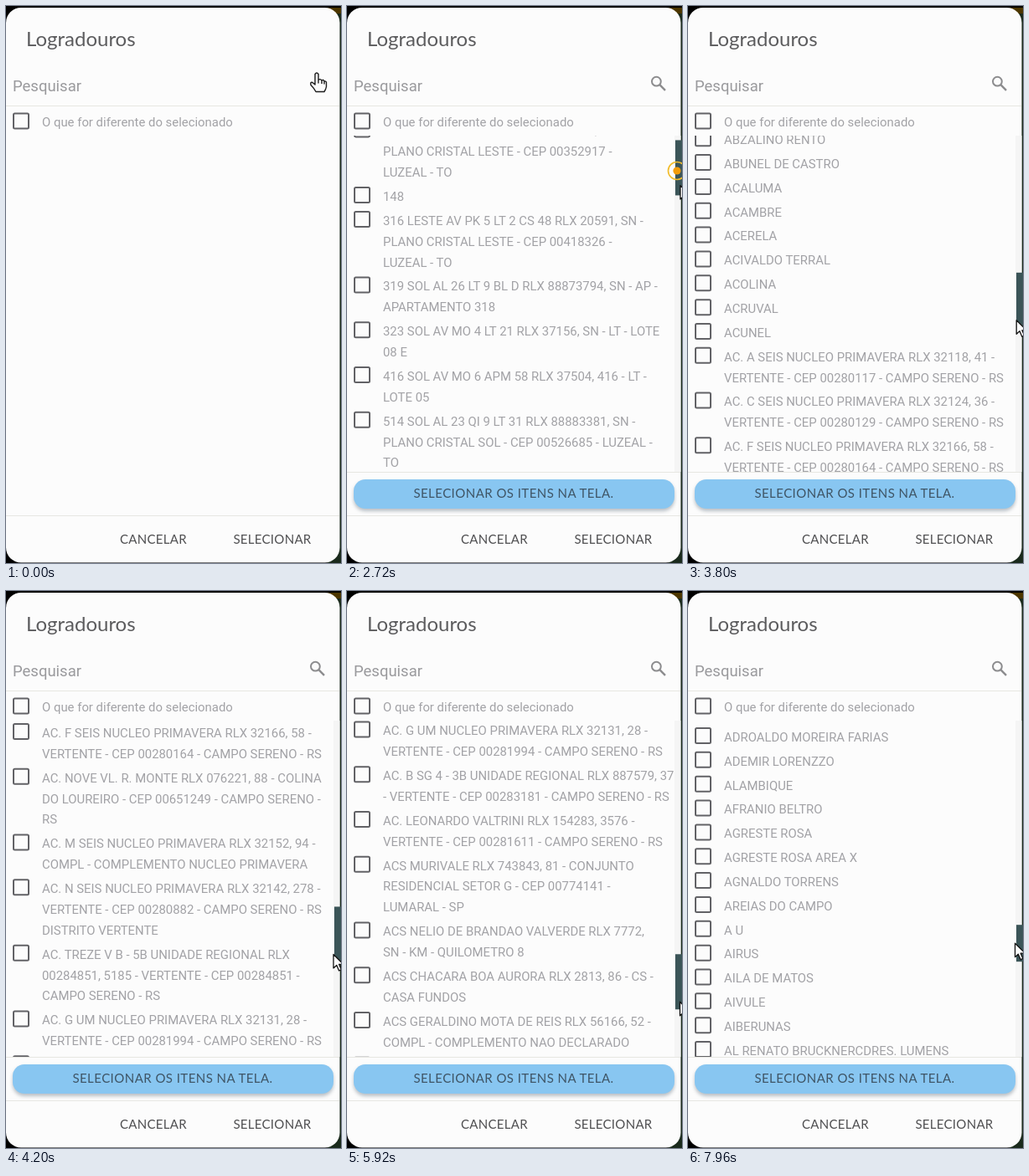
Write an HTML page that moves like this. It is 400x666 px and loops after 8000 ms.

```html
<!DOCTYPE html>
<html lang="pt-BR">
<head>
<meta charset="utf-8">
<title>Logradouros</title>
<style>
  html, body { margin: 0; width: 100%; height: 100%; overflow: hidden; background: #000; }
  svg { display: block; width: 100%; height: 100%; }
  text { font-family: Roboto, "Liberation Sans", sans-serif; font-size: 14.9px; fill: #a2a2a6; }
  .ui { font-family: Lato, "Open Sans", sans-serif; font-size: 15px; fill: #505052; letter-spacing: .3px; text-anchor: middle; }
  .title { font-family: Lato, "Open Sans", sans-serif; font-size: 24px; fill: #5c5c5e; }
  .search { font-size: 18.5px; fill: #9a9a9d; }
  .box { fill: none; stroke: #626266; stroke-width: 2; }
  .rule { stroke: #e7e7e2; stroke-width: 1; }
</style>
</head>
<body>
<svg viewBox="0 0 400 666" preserveAspectRatio="none">
  <defs>
    <clipPath id="view"><rect x="0" y="155" width="398" height="402"/></clipPath>
    <filter id="blur" x="-10%" y="-40%" width="120%" height="200%"><feGaussianBlur stdDeviation="2"/></filter>
  </defs>
  <rect width="400" height="666" fill="#000"/>
  <rect x="384" y="2" width="16" height="7" fill="#4c3600"/>
  <rect x="384" y="9" width="16" height="657" fill="#1a2a1c"/>
  <rect y="2" width="398.5" height="663.5" rx="18" fill="#fcfcfc"/>

  <text class="title" x="24" y="48">Logradouros</text>
  <text class="search" x="8" y="101.5">Pesquisar</text>
  <g id="lens" fill="none" stroke="#8c8c8e" stroke-width="2">
    <circle cx="369.4" cy="90.2" r="5.4"/>
    <path d="M373.6 94.4L380 100.8" stroke-width="2.4"/>
  </g>
  <path class="rule" d="M0 119.5H398"/>
  <rect class="box" x="9" y="128.5" width="18" height="18" rx="1.5"/>
  <text x="43" y="144.3">O que for diferente do selecionado</text>

  <g id="results">
    <rect x="391" y="155" width="7.5" height="402" fill="#f5f5f5"/>
    <g clip-path="url(#view)"><g id="list"></g></g>
    <rect id="thumb" x="392" width="8" fill="#3b5558"/>
    <path class="rule" d="M0 557.5H398"/>
    <rect x="8" y="569" width="383" height="35" rx="14" fill="#8c96a0" opacity=".6" filter="url(#blur)"/>
    <rect x="8" y="566" width="383" height="35" rx="14" fill="#88c6f1"/>
    <text class="ui" x="199" y="588.3" style="letter-spacing:.45px;fill:#3f5566">SELECIONAR OS ITENS NA TELA.</text>
  </g>

  <path class="rule" d="M0 609.5H398"/>
  <text class="ui" x="176" y="643">CANCELAR</text>
  <text class="ui" x="318" y="643">SELECIONAR</text>

  <g id="pulse">
    <circle id="ring" fill="none" stroke="#f2bc2c"/>
    <circle id="dot" r="4.6" fill="#f39c0a"/>
  </g>
  <path id="hand" fill="#fcfcfc" stroke="#1c1c1c" stroke-width="1.4" stroke-linejoin="round"
    d="M-2 2Q0-1 2 2V9Q4 7 6 9.5Q8 8 9 10.500Q12 10 11.500 13V17Q11 20 9 23H-1Q-3 19-7 15Q-8 11-5 12L-2 14.500ZM2 9V13M6 9.500V13.500M9 10.500V14"/>
  <path id="arrow" fill="#fcfcfc" stroke="#111" stroke-width="1.3" stroke-linejoin="round"
    d="M0 0V16.500L3.800 13L6.600 19.500L9.400 18.300L6.700 12H12Z"/>
</svg>
<script>
const LOOP = 8000, LOADED = 1000, NEXT_PAGE = 7100;
const TOP = 155, VIEW = 402, LINE = 24.9, PAD = 3.95, FIRST = 182;
const $ = id => document.getElementById(id);

// One entry per line; "|" breaks an entry into several text lines.
const entries = `164 LESTE AL 26 LT 17 RLX 88881940, SN -|PLANO CRISTAL LESTE - CEP 00352917 -|LUZEAL - TO
148
316 LESTE AV PK 5 LT 2 CS 48 RLX 20591, SN -|PLANO CRISTAL LESTE - CEP 00418326 -|LUZEAL - TO
319 SOL AL 26 LT 9 BL D RLX 88873794, SN - AP -|APARTAMENTO 318
323 SOL AV MO 4 LT 21 RLX 37156, SN - LT - LOTE|08 E
416 SOL AV MO 6 APM 58 RLX 37504, 416 - LT -|LOTE 05
514 SOL AL 23 QI 9 LT 31 RLX 88883381, SN -|PLANO CRISTAL SOL - CEP 00526685 - LUZEAL -|TO
517 SOL AL 9 LT 14 RLX 37812, SN - AP -|APARTAMENTO 102
528 LESTE AL 7 LT 33 RLX 88870462, SN -|PLANO CRISTAL LESTE - CEP 00417449|LUZEAL - TO
616 SOL AL 5 Q 41 LT 4 RLX 37542, SN - LT - LOTE|04
618 SOL AL 42 QI 29 LT 26 RLX 22367, SN - PLANO|CRISTAL SOL - CEP 00527298 - LUZEAL - TO
715 LESTE AL 5 CJ KM 3 BL 28 RLX 21912, SN -|AP - APARTAMENTO 415
817 SOL AL 3 LT 33 RLX 88880639, SN - PLANO|CRISTAL SOL - CEP 00533483 - LUZEAL - TO
77
ABRILA TOMEX
ABRUNE
ABLUM
ABOLI
ABRONEL
ABUVERA
ABZALINO RENTO
ABUNEL DE CASTRO
ACALUMA
ACAMBRE
ACERELA
ACIVALDO TERRAL
ACOLINA
ACRUVAL
ACUNEL
AC. A SEIS NUCLEO PRIMAVERA RLX 32118, 41 -|VERTENTE - CEP 00280117 - CAMPO SERENO - RS
AC. C SEIS NUCLEO PRIMAVERA RLX 32124, 36 -|VERTENTE - CEP 00280129 - CAMPO SERENO - RS
AC. F SEIS NUCLEO PRIMAVERA RLX 32166, 58 -|VERTENTE - CEP 00280164 - CAMPO SERENO - RS
AC. NOVE VL. R. MONTE RLX 076221, 88 - COLINA|DO LOUREIRO - CEP 00651249 - CAMPO SERENO -|RS
AC. M SEIS NUCLEO PRIMAVERA RLX 32152, 94 -|COMPL - COMPLEMENTO NUCLEO PRIMAVERA
AC. N SEIS NUCLEO PRIMAVERA RLX 32142, 278 -|VERTENTE - CEP 00280882 - CAMPO SERENO - RS|DISTRITO VERTENTE
AC. TREZE V B - 5B UNIDADE REGIONAL RLX|00284851, 5185 - VERTENTE - CEP 00284851 -|CAMPO SERENO - RS
AC. G UM NUCLEO PRIMAVERA RLX 32131, 28 -|VERTENTE - CEP 00281994 - CAMPO SERENO - RS
AC. B SG 4 - 3B UNIDADE REGIONAL RLX 887579, 37|- VERTENTE - CEP 00283181 - CAMPO SERENO - RS
AC. LEONARDO VALTRINI RLX 154283, 3576 -|VERTENTE - CEP 00281611 - CAMPO SERENO - RS
ACS MURIVALE RLX 743843, 81 - CONJUNTO|RESIDENCIAL SETOR G - CEP 00774141 -|LUMARAL - SP
ACS NELIO DE BRANDAO VALVERDE RLX 7772,|SN - KM - QUILOMETRO 8
ACS CHACARA BOA AURORA RLX 2813, 86 - CS -|CASA FUNDOS
ACS GERALDINO MOTA DE REIS RLX 56166, 52 -|COMPL - COMPLEMENTO NAO DECLARADO
ACS GARCA NOBRE RLX 451681, 767 - BALN BOM|LAGO - CEP 00975321 - RIO LUZIO - SP
AC. X SG 6 - 2B UNIDADE REGIONAL RLX 88588, 385|- VERTENTE - CEP 00283375 - CAMPO SERENO - RS
ADELMO VIEIRA
ADROALDO MOREIRA FARIAS
ADEMIR LORENZZO
ALAMBIQUE
AFRANIO BELTRO
AGRESTE ROSA
AGRESTE ROSA AREA X
AGNALDO TORRENS
AREIAS DO CAMPO
A U
AIRUS
AILA DE MATOS
AIVULE
AIBERUNAS
AL RENATO BRUCKNERCDRES. LUMENS
AL AURELIA`.split("\n").map(e => e.split("|"));

function buildList() {
  let y = FIRST, out = "";
  for (const lines of entries) {
    out += `<rect class="box" x="9" y="${y - 10.5}" width="18" height="18" rx="1.5"/>`;
    lines.forEach((s, i) => { out += `<text x="43" y="${y + 5.3 + i * LINE}">${s}</text>`; });
    y += lines.length * LINE + PAD;
  }
  $("list").innerHTML = out;
}

const ramp = (t, a, b) => Math.max(0, Math.min(1, (t - a) / (b - a)));
const mix = (a, b, u) => a + (b - a) * u;
const smooth = u => u * u * (3 - 2 * u);

function set(id, attrs) {
  for (const k in attrs) $(id).setAttribute(k, attrs[k]);
}
const show = (id, on) => set(id, { visibility: on ? "visible" : "hidden" });
const move = (id, x, y) => set(id, { transform: `translate(${x} ${y})` });

// Three drags of the scroll bar, then one more on the longer list.
function scrollAt(t) {
  return 1497 * ramp(t, 2684, 4360) + 204 * ramp(t, 4640, 5600)
    + 346 * ramp(t, 6560, 6924) + 184 * ramp(t, 7280, 7600);
}

// The pointer travels to the bar, then follows the thumb at a slowly changing grip.
function pointerAt(t, thumbY) {
  const reach = smooth(ramp(t, 1480, 2120)), regrip = ramp(t, 6160, 6320);
  const sway = 394.5 + 3.5 * Math.cos(2 * Math.PI * (t - 2720) / 2960);
  const grip = t < NEXT_PAGE
    ? mix(mix(42, 57, ramp(t, 2640, 2740)), 36, regrip)
    : mix(148, 22, smooth(ramp(t, NEXT_PAGE, 7320)));
  return [mix(371, mix(sway, 390.5, regrip), reach), mix(88, thumbY + grip, reach)];
}

const clicks = [
  { at: 640, x: 371, y: 90, life: 720 },
  { at: 2640, x: 394, y: 197, life: 720 },
  { at: 4600, x: 393, y: 457, life: 500 },
  { at: 6560, x: 393, y: 476, life: 720 }];

function drawPulse(t) {
  const c = clicks.find(k => t >= k.at && t < k.at + k.life);
  show("pulse", c);
  if (!c) return;
  const age = t - c.at;
  move("pulse", c.x, c.y);
  set("ring", { r: 8 + age * .031, "stroke-width": 1.4 + age / 300, opacity: 1 - (age / c.life) ** 2 });
  set("dot", { opacity: 1 - ramp(age, 280, 480) });
}

function draw(t) {
  const scroll = scrollAt(t);
  const size = t < NEXT_PAGE ? 66 : 44;
  const total = VIEW * VIEW / size;
  const thumbY = TOP + scroll * (VIEW - size) / (total - VIEW);
  move("list", 0, -scroll);
  set("thumb", { y: thumbY, height: size });
  show("results", t >= LOADED);
  show("lens", t >= 40);

  const pointing = t < 1520;
  show("hand", pointing);
  show("arrow", !pointing);
  move("hand", 371, t < 40 ? 79.5 : 88);
  move("arrow", ...pointerAt(t, thumbY));
  drawPulse(t);
}

buildList();
const start = performance.now();
function tick() {
  draw((performance.now() - start) % LOOP);
  requestAnimationFrame(tick);
}
tick();
</script>
</body>
</html>
```
